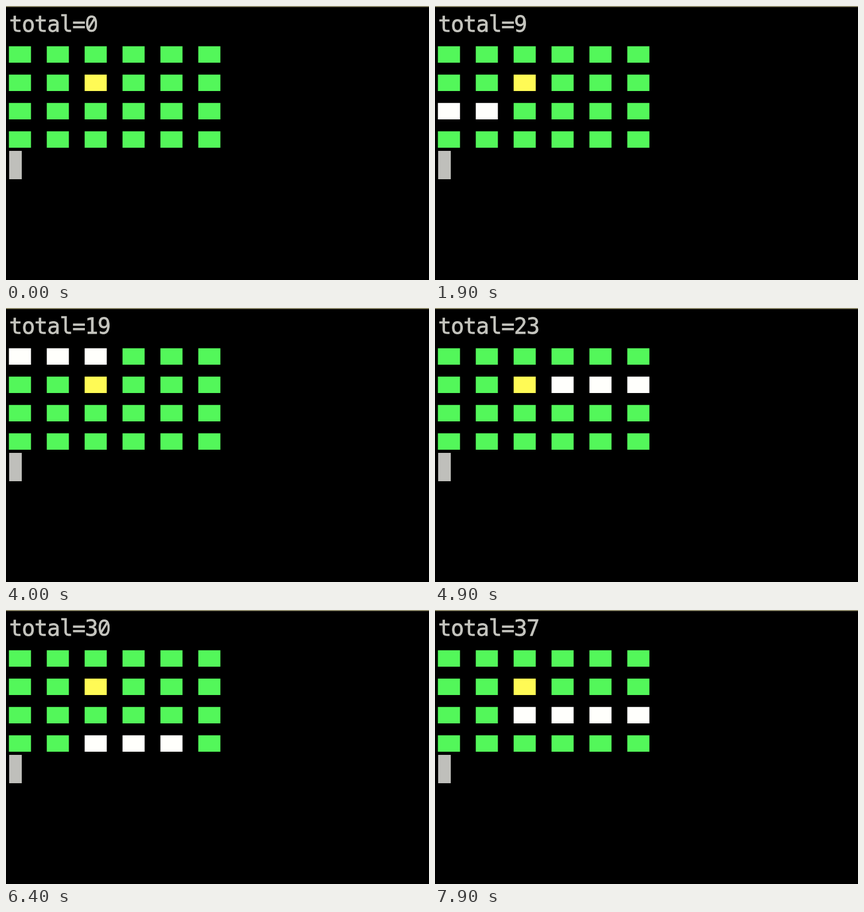
Animation, 804 px wide and 522 px high, one loop 8 s. Source, as an HTML page with a canvas:

```html
<!DOCTYPE html>
<html lang="en">
<head>
<meta charset="utf-8">
<title>Counting runs in a grid</title>
<style>
  html, body { margin: 0; width: 100%; height: 100%; overflow: hidden; background: #000; }
  canvas { display: block; }
</style>
</head>
<body>
<canvas id="stage" width="804" height="522"></canvas>
<script>
const ctx = document.getElementById('stage').getContext('2d');
const COLS = 6, ROWS = 4;
const BLOCK = { row: 1, col: 2 };
const CHAR_W = 24, LINE_H = 54, LEFT = 6, TOP = 6;
const LOOP = 8000, TICK = 100, STEP = 212, LEAD = 40;

// Every horizontal run that avoids the blocked cell, shortest first.
const runs = [];
for (let len = 2; len <= COLS; len++)
  for (let row = 0; row < ROWS; row++)
    for (let col = 0; col + len <= COLS; col++) {
      const blocked = row === BLOCK.row && col <= BLOCK.col && BLOCK.col < col + len;
      if (!blocked) runs.push({ row, col, len });
    }

function cellColor(row, col, run) {
  if (row === BLOCK.row && col === BLOCK.col) return '#fffa55';
  const lit = run && row === run.row && col >= run.col && col < run.col + run.len;
  return lit ? '#fffffc' : '#53f75a';
}

function drawText(text) {
  ctx.fillStyle = ctx.strokeStyle = '#c4c4be';
  ctx.lineWidth = 0.8;
  [...text].forEach((ch, i) => {
    // Noto has the slashed zero.
    const family = ch === '0' ? 'Noto Sans Mono' : 'DejaVu Sans Mono';
    ctx.font = `42px "${family}", monospace`;
    const x = LEFT + i * CHAR_W;
    ctx.fillText(ch, x, 48.5);
    ctx.strokeText(ch, x, 48.5);
  });
}

function draw(time) {
  const tick = Math.floor(time / TICK) * TICK;
  const total = Math.floor((tick + LEAD) / STEP);
  const run = runs[total - 1];

  ctx.fillStyle = '#000';
  ctx.fillRect(0, 0, 804, 522);
  ctx.fillStyle = '#8c8868';
  ctx.fillRect(0, 0, 804, 2);

  drawText('total=' + total);

  for (let row = 0; row < ROWS; row++)
    for (let col = 0; col < COLS; col++) {
      ctx.fillStyle = cellColor(row, col, run);
      ctx.fillRect(5.5 + col * CHAR_W * 3, 76.7 + row * LINE_H, 42, 31.3);
    }

  ctx.fillStyle = '#bfbfbb';
  ctx.fillRect(LEFT, TOP + 5 * LINE_H, CHAR_W, LINE_H);
}

const start = performance.now();
function frame() {
  draw((performance.now() - start) % LOOP);
  requestAnimationFrame(frame);
}
frame();
</script>
</body>
</html>
```
